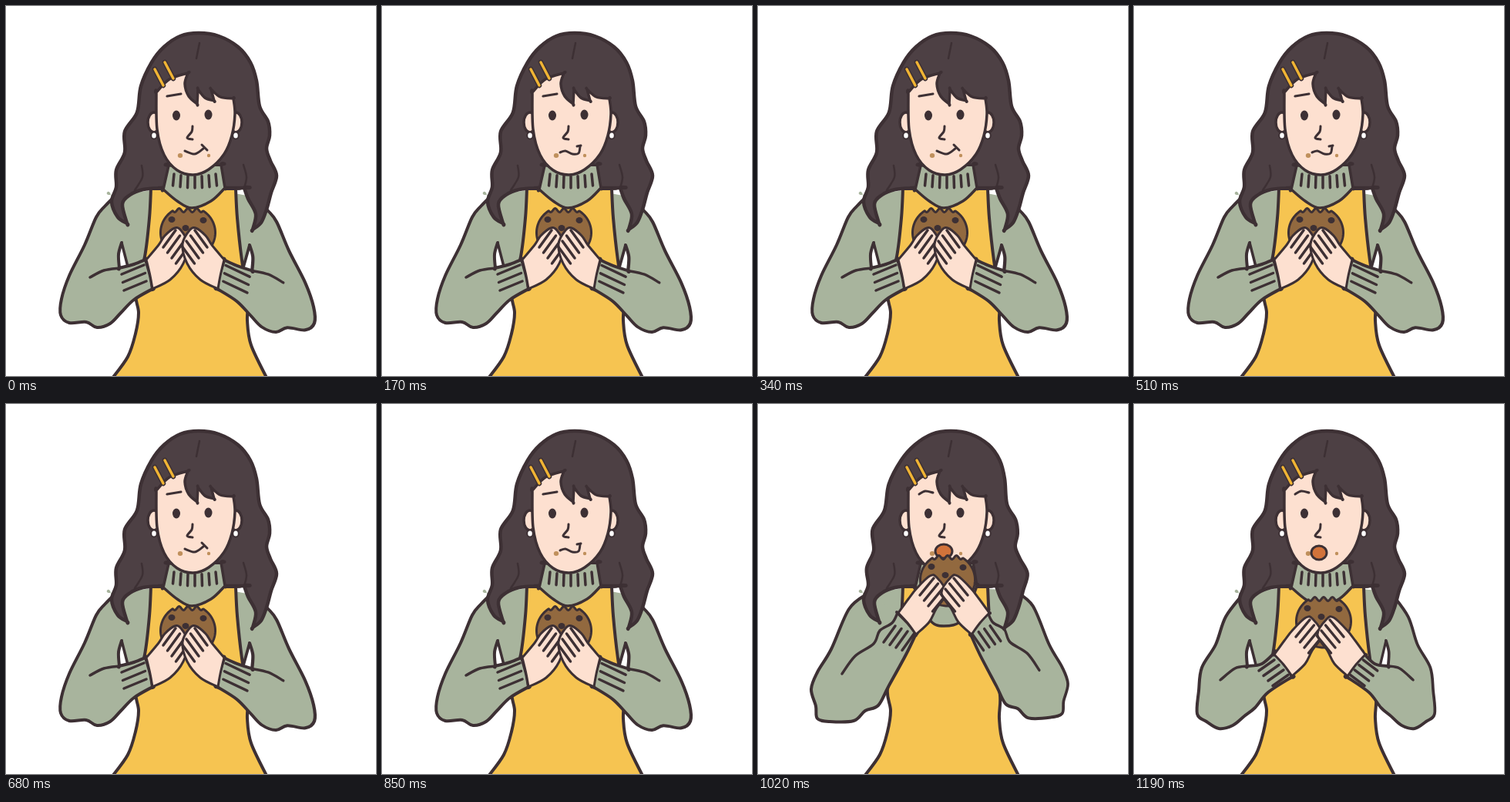
These frames come from a looping animation (480 px wide and 480 px high, 1360 ms). An HTML page with a canvas:

```html
<!DOCTYPE html>
<html lang="en">
<head>
<meta charset="utf-8">
<title>Cookie snack</title>
<style>
html, body { margin: 0; width: 100%; height: 100%; overflow: hidden; background: #fff; }
canvas { display: block; width: 480px; height: 480px; }
</style>
</head>
<body>
<canvas id="stage" width="480" height="480"></canvas>
<script>
const ctx = document.getElementById('stage').getContext('2d');
const INK = '#3d3034', HAIR = '#4d4044', SKIN = '#fde0d0', GREEN = '#a8b49d',
  YELLOW = '#f6c451', COOKIE = '#92693f', CRUMB = '#c0905c', MOUTH = '#d2733b';
const STEP = 170;
ctx.lineCap = ctx.lineJoin = 'round';

// Smooth curve through "x,y" points; "|" after a point makes it a corner.
function trace(text, closed, sway = 0) {
  const pts = [];
  for (const word of text.split(' ')) {
    const [x, y] = word.replace('|', '').split(',').map(Number);
    const p = [x - sway * Math.max(0, Math.sin(Math.PI * (y - 35) / 200)), y];
    pts.push(p);
    if (word.endsWith('|')) pts.push(p);
  }
  const n = pts.length;
  const at = i => pts[closed ? (i + n) % n : Math.max(0, Math.min(n - 1, i))];
  const path = new Path2D();
  path.moveTo(...pts[0]);
  for (let i = 0; i < (closed ? n : n - 1); i++) {
    const [a, b, c, d] = [at(i - 1), at(i), at(i + 1), at(i + 2)];
    path.bezierCurveTo(b[0] + (c[0] - a[0]) / 6, b[1] + (c[1] - a[1]) / 6,
      c[0] - (d[0] - b[0]) / 6, c[1] - (d[1] - b[1]) / 6, c[0], c[1]);
  }
  if (closed) path.closePath();
  return path;
}
function paint(path, fill, width) {
  if (fill) { ctx.fillStyle = fill; ctx.fill(path); }
  if (width) { ctx.strokeStyle = INK; ctx.lineWidth = width; ctx.stroke(path); }
}
const shape = (text, fill, width = 4) => paint(trace(text, true), fill, width);
const line = (text, width = 3.5) => paint(trace(text), null, width);
function oval(x, y, rx, ry, fill, width) {
  const path = new Path2D();
  path.ellipse(x, y, rx, ry, 0, 0, 2 * Math.PI);
  paint(path, fill, width);
}
// Parallel strokes, each shifted by (dx, dy) from the one before.
function rows(n, [x1, y1, x2, y2], [dx, dy], width, color = INK) {
  ctx.strokeStyle = color;
  ctx.lineWidth = width;
  ctx.beginPath();
  for (let i = 0; i < n; i++) {
    ctx.moveTo(x1 + i * dx, y1 + i * dy);
    ctx.lineTo(x2 + i * dx, y2 + i * dy);
  }
  ctx.stroke();
}
// Draws a left part, then its reflection.
function bothSides(part, { from, scale = 1, tilt = 0 }) {
  part();
  ctx.save();
  ctx.transform(-scale, -tilt, 0, 1, from, 185 * tilt);
  part();
  ctx.restore();
}

const resting = {
  arm: '142,246 128,260 117,274 102,310 82,350 72,380 71,401 82,411 104,410 118,417 135,412 149,398 166,381 190,367| 187,350 181,329| 166,335 147,340| 146,322 150,307',
  fold: '147,340 127,343 109,352',
  cuff: [3, [150, 348, 179, 336], [1.5, 10.5]],
  mirror: { from: 475.6, scale: 1.064, tilt: 0.09 },
  hand: '182,329| 198,310 206,298 219,288 227,291 236,309 230,334 213,355 190,367| 187,350',
  fingers: [220, 291, 204, 313],
  handMirror: { from: 465 },
  cookie: [236, 294], brow: '209,117 227,114', neckline: 262, sway: 0
};
const raised = {
  ...resting,
  hand: '182,271| 195,253 206,239 223,223 232,225 244,245 231,266 222,283 205,299| 194,284',
  fingers: [228, 226, 210, 248],
  handMirror: { from: 482 },
  mirror: { from: 466, scale: 0.927 },
  brow: '209,117 217,113 227,115'
};
const smile = { ...resting, mouth: ['232,188 245,192 256,185', '254,180 261,187'] };
const chew = { ...resting, mouth: ['231,190 238,188 247,192 255,191 257,182', '253,182 258,181'] };
const bite = {
  ...raised,
  arm: '142,246 118,266 95,318 77,348 69,370 75,392 77,408 93,412 124,411 139,398 156,391 169,367 192,325 205,298| 194,284 181,271|',
  fold: '181,271 174,284 158,294 150,311 126,327 109,350',
  cuff: [4, [163, 309, 178, 288], [8, 3.5]],
  mirror: { ...raised.mirror, tilt: -0.06 },
  cookie: [246, 228], gape: [241, 191, 11, 9], neckline: 288, sway: 6
};
const open = {
  ...raised,
  arm: '142,246 119,276 106,312 88,342 84,372 82,402 94,412 110,421 128,417 143,405 157,394 174,374 205,354| 196,337 183,322| 166,337 147,340| 146,322 150,307',
  fold: '147,340 131,343 112,358',
  cuff: [4, [162, 346, 182, 332], [6, 6.5]],
  cookie: [246, 282], gape: [240, 193, 10, 9], lift: 54
};
const poses = [smile, chew, smile, chew, smile, chew, bite, open];

function body(pose) {
  bothSides(() => {
    shape('136,245| 150,307| 158,338| 200,338| 200,238|', GREEN, 0);
    line('150,307 158,338');
  }, pose.mirror);
  shape('188,237| 298,237| 300,275 306,330 314,378 313,408 318,440 339,484| 137,484| 158,455 168,425 172,398 168,370 180,325 186,275', YELLOW);
  bothSides(() => {
    paint(trace(pose.arm), GREEN, 4);
    line(pose.fold);
    rows(...pose.cuff, 3.5);
  }, pose.mirror);
}

function head(pose) {
  const dip = pose.neckline;
  paint(trace('250,35 276,39 301,53 317,73 325,97 329,130 340,150 342,168 338,185 343,201 351,220 344,242 338,264 331,281 320,290| 324,270 314,250 309,236| 205,236| 178,238 161,245 151,257 157,282| 145,274 137,254 143,235 143,213 154,190 154,163 170,138 175,104 189,73 205,53 226,39', true, pose.sway), HAIR, 4.5);
  line('251,48 247,68', 2.5);
  line('176,207 177,222 167,239', 2.5);
  line('308,206 312,222 309,236', 2.5);
  shape(`211,207| 204,238| 222,${dip - 9} 241,${dip} 266,${dip - 9} 284,236| 279,206|`, GREEN, 3.5);
  for (let i = -3; i <= 3; i++) {
    const x = 245 + 9 * i, y = 221 - i * i / 3;
    rows(1, [x, y, x + i / 2, y + 15], [0, 0], 3.5);
  }
  bothSides(() => {
    oval(192, 151, 8, 13, SKIN, 3.5);
    oval(192, 168, 3.8, 4.5, '#fff', 2);
  }, { from: 490 });
  shape('195,112| 212,95 236,87| 232,101 237,117 248,127| 249,108| 258,119 270,123| 266,108| 278,118 295,120| 297,140 293,168 283,192 263,212 243,219 222,213 205,193 196,160', SKIN, 3.5);
  const clip = [2, [193, 82, 204, 103], [13, -9]];
  rows(...clip, 6.5);
  rows(...clip, 3.5, '#f0b434');
  line(pose.brow, 3);
  oval(221, 142, 5, 6.5, INK);
  oval(262.5, 141, 5, 6.5, INK);
  line('242,156 241,163 235,171 242,173', 3);
  oval(226, 194, 3.2, 3, CRUMB);
  oval(263, 194, 2.2, 2.2, CRUMB);
  for (const stroke of pose.mouth || []) line(stroke, 3);
  if (pose.gape) oval(...pose.gape, MOUTH, 3);
}

// A disc whose top is bitten off along a wavy edge.
function cookie([cx, cy]) {
  const path = new Path2D();
  for (let a = 0; a < 2 * Math.PI; a += 0.04) {
    const dx = 35.5 * Math.cos(a);
    const dy = Math.max(34 * Math.sin(a), -29 - 2.5 * Math.cos(dx * 0.55));
    path.lineTo(cx + dx, cy + dy);
  }
  path.closePath();
  paint(path, COOKIE, 3);
  for (const [dx, dy] of [[-21, -17], [-3, -6], [20, -16]]) oval(cx + dx, cy + dy, 4.5, 4, INK);
}

function draw(pose) {
  ctx.fillStyle = '#fff';
  ctx.fillRect(0, 0, 480, 480);
  body(pose);
  head(pose);
  cookie(pose.cookie);
  ctx.save();
  ctx.translate(0, pose.lift || 0);
  bothSides(() => {
    shape(pose.hand, SKIN, 3);
    rows(4, pose.fingers, [5.5, 7], 3.5);
  }, pose.handMirror);
  ctx.restore();
}

function tick(now) {
  draw(poses[Math.floor(now / STEP) % poses.length]);
  requestAnimationFrame(tick);
}
tick(0);
</script>
</body>
</html>
```
